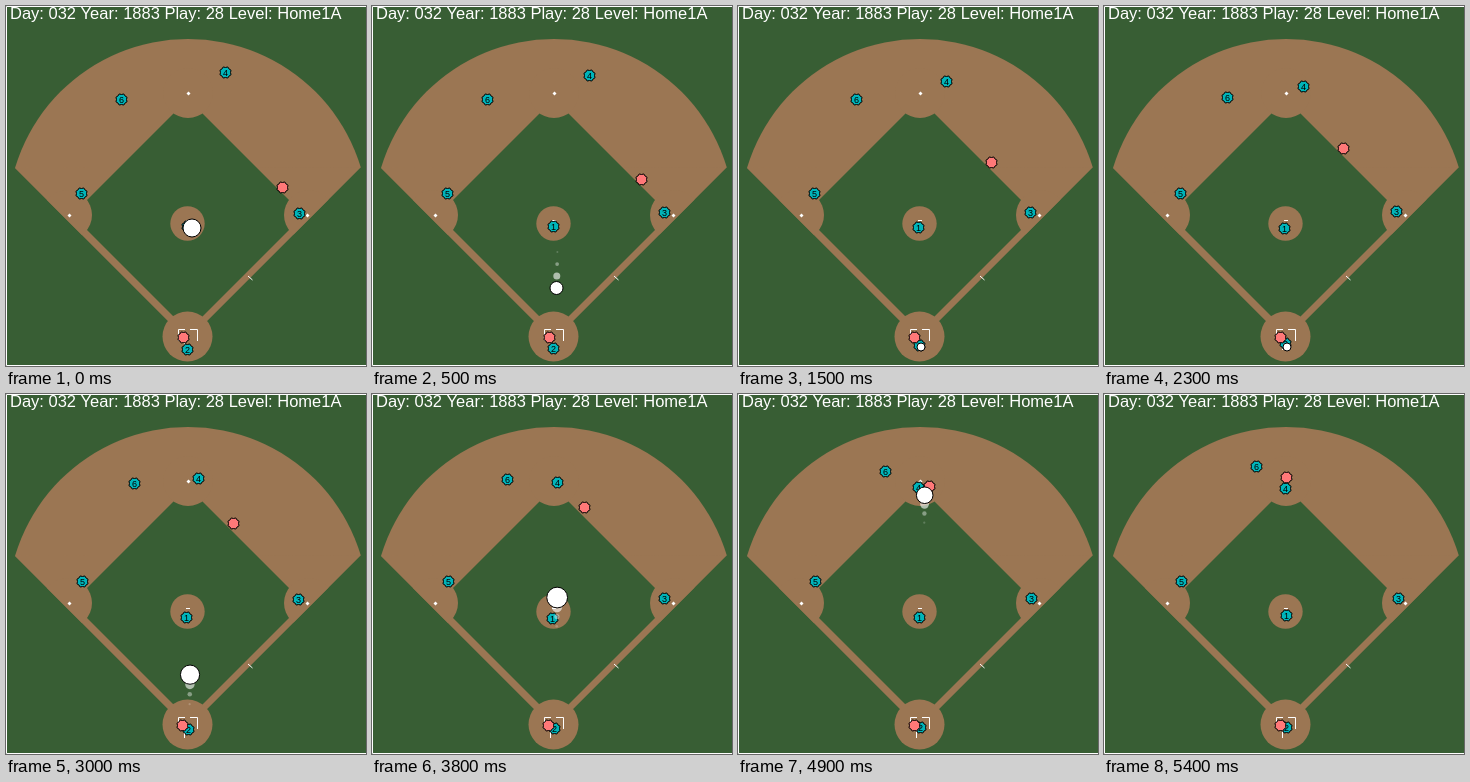
An HTML page with a canvas that plays this animation: 360x360 px, repeating every 5.5 s.

```html
<!DOCTYPE html>
<html lang="en">
<head>
<meta charset="utf-8">
<title>Infield play</title>
<style>
  html, body { margin: 0; width: 100%; height: 100%; overflow: hidden; background: #385e34; }
  canvas { display: block; width: 100vw; height: 100vh; }
</style>
</head>
<body>
<canvas id="stage" width="360" height="360"></canvas>
<script>
const ctx = document.getElementById('stage').getContext('2d');
const GRASS = '#385e34', DIRT = '#9b7653', TEAL = '#00b4b9', RED = '#ff7878';
const STEP = 100, STEPS = 55, TAU = Math.PI * 2;
const CATCH = 10, THROW = 24, ARRIVE = 50;

// Every player follows one cubic Bezier over the whole loop.
const players = [
  { label: '1', path: [[181, 220], [180, 218], [178, 229], [182, 221]] },
  { label: '2', path: [[181, 343], [181, 338], [182, 332], [182, 333]] },
  { label: '3', path: [[293, 207], [290, 205], [292, 204], [294, 204]] },
  { label: '4', path: [[219, 66], [213, 76], [174, 90], [181, 94]] },
  { label: '5', path: [[75, 187], [77, 187], [75, 187], [77, 187]] },
  { label: '6', path: [[115, 93], [114, 95], [132, 90], [152, 72]] },
  { path: [[276, 181], [251, 153], [216, 117], [182, 83]] },
  { path: [[177, 331], [176, 331], [176, 331], [176, 331]] }
];

function bezier([a, b, c, d], u) {
  const v = 1 - u;
  return [0, 1].map(i =>
    v * v * v * a[i] + 3 * u * v * v * b[i] + 3 * u * u * v * c[i] + u * u * u * d[i]);
}

// Ball position and radius; the radius stands for its height.
function ballAt(s) {
  if (s < THROW) {
    const n = Math.min(s, CATCH);
    return [186 - 0.3 * n, Math.min(222 + 12 * n, 341), 9 - 0.5 * n];
  }
  const n = s - THROW;
  return [183.2 + 0.14 * n, 340 - 10 * n + 0.018 * n * n, 8 + 2.4 * Math.sin(Math.PI * n / 26)];
}

function disc(x, y, r, fill, stroke) {
  ctx.beginPath();
  ctx.arc(x, y, r, 0, TAU);
  paint(fill, stroke);
}

function polygon(pts, fill, stroke) {
  ctx.beginPath();
  pts.forEach(([x, y]) => ctx.lineTo(x, y));
  ctx.closePath();
  paint(fill, stroke);
}

function paint(fill, stroke) {
  ctx.fillStyle = fill;
  ctx.fill();
  if (!stroke) return;
  ctx.strokeStyle = stroke;
  ctx.lineWidth = 1;
  ctx.stroke();
}

function line(...pts) {
  ctx.beginPath();
  pts.forEach(([x, y]) => ctx.lineTo(x, y));
  ctx.strokeStyle = '#fff';
  ctx.lineWidth = 1;
  ctx.stroke();
}

function diamond(x, y, r, fill) {
  polygon([[x, y - r], [x + r, y], [x, y + r], [x - r, y]], fill);
}

function drawField() {
  ctx.fillStyle = GRASS;
  ctx.fillRect(0, 0, 360, 360);

  ctx.save();
  ctx.beginPath();
  [[181.5, 334.5], [9, 162], [9, 0], [355, 0], [355, 161]].forEach(([x, y]) => ctx.lineTo(x, y));
  ctx.clip();
  disc(182, 213.5, 180.5, DIRT);
  polygon([[181.5, 334.5], [9, 162], [355, 161]], DIRT);
  diamond(182, 209, 116, GRASS);
  for (const [x, y] of [[61, 209], [303, 209], [182, 87]]) disc(x, y, 25, DIRT);
  ctx.restore();

  disc(181.5, 217.5, 17.2, DIRT);
  disc(181.5, 330.5, 25, DIRT);

  for (const [x, y] of [[63, 209], [301, 209], [182, 87]]) diamond(x + 0.5, y + 0.5, 2, '#fff');
  line([180, 214.5], [184, 214.5]);
  line([242, 270], [246.5, 274]);
  line([172.5, 335], [172.5, 323.5], [179, 323.5]);
  line([184, 323.5], [191.5, 323.5], [191.5, 335]);
  line([178.5, 337], [178.5, 344]);
  line([360, 0.5], [0.5, 0.5], [0.5, 359.5], [360, 359.5]);

  ctx.fillStyle = '#fff';
  ctx.font = '16.5px "Liberation Sans", Arial, sans-serif';
  ctx.textAlign = 'left';
  ctx.fillText('Day: 032 Year: 1883 Play: 28 Level: Home1A', 4, 13);
}

function drawPlayer({ label, path }, s) {
  const [x, y] = bezier(path, s / (STEPS - 1)).map(v => Math.round(v) + 0.5);
  // Round badge with eight small bumps.
  const rim = Array.from({ length: 16 }, (_, i) => {
    const r = i % 2 ? 6 : 5, a = i * TAU / 16;
    return [x + r * Math.cos(a), y + r * Math.sin(a)];
  });
  polygon(rim, label ? TEAL : RED, '#000');
  if (!label) return;
  ctx.fillStyle = '#000';
  ctx.font = '9px "Liberation Sans", Arial, sans-serif';
  ctx.textAlign = 'center';
  ctx.fillText(label, x, y + 3);
}

function drawBall(s) {
  if (s > ARRIVE) return;
  const from = s < THROW ? 0 : THROW;
  for (let k = 3; k > 0; k--) {
    if (s - k < from) continue;
    const [x, y, r] = ballAt(s - k);
    disc(x, y, r * 0.5 ** k, `rgba(255,255,255,${0.8 - k * 0.2})`);
  }
  disc(...ballAt(s), '#fff', '#000');
}

function draw(ms) {
  const s = Math.floor(ms / STEP) % STEPS;
  drawField();
  players.forEach(p => drawPlayer(p, s));
  drawBall(s);
}

const start = performance.now();
function loop() {
  draw(performance.now() - start);
  requestAnimationFrame(loop);
}
loop();
</script>
</body>
</html>
```
